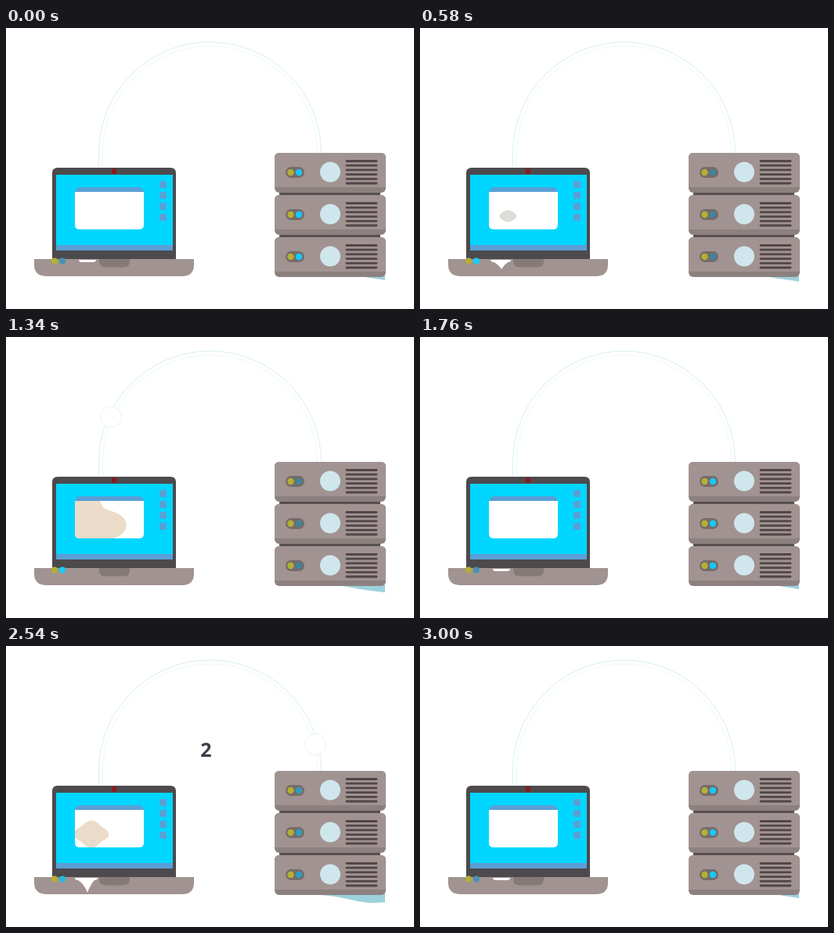
These frames come from a looping animation (521x360 px, 3020 ms). An HTML page:

```html
<!DOCTYPE html>
<html lang="en">
<head>
<meta charset="utf-8">
<title>Laptop and server</title>
<style>
  html, body { margin: 0; width: 100%; height: 100%; overflow: hidden; background: #fff; }
  svg { display: block; width: 521px; height: 360px; }
  #count { font: 700 25px "Open Sans", "Noto Sans", sans-serif; fill: #3b3f48; text-anchor: middle; }
</style>
</head>
<body>
<svg viewBox="0 0 521 360">
  <defs>
    <clipPath id="window"><path d="M88 210H176V252Q176 258 170 258H94Q88 258 88 252Z"/></clipPath>
    <clipPath id="screen"><rect x="64" y="188" width="149" height="97"/></clipPath>
    <g id="unit">
      <rect width="142" height="51" rx="6" fill="#8d8180"/>
      <path d="M0 44V6Q0 0 6 0H136Q142 0 142 6V44Z" fill="#a19391"/>
      <rect x="14" y="18" width="24" height="14" rx="7" fill="#766b6b"/>
      <circle cx="20.500" cy="25" r="4.200" fill="#b4b033"/>
      <circle class="lamp" cx="31" cy="25" r="4.200"/>
      <circle cx="71" cy="24.500" r="13" fill="#d0e6ed"/>
      <path class="vents" stroke="#514648" stroke-width="2.800" stroke-linecap="round"/>
    </g>
  </defs>

  <g fill="none">
    <path d="M118.500 178V160A142 142 0 0 1 402.500 160" stroke="#d8eff0"/>
    <path d="M123.500 178V160A137 137 0 0 1 397.500 160" stroke="#eef9f8"/>
  </g>
  <circle id="ball" r="13.500" fill="#fff" stroke="#e6f4f5"/>
  <text id="count" x="255.500" y="142">2</text>

  <path id="puddle" fill="#9cd1dc"/>
  <path d="M349 209H478V216H349ZM349 263H478V270H349Z" fill="#5a4f50"/>
  <g id="rack"></g>

  <path d="M59 297V186Q59 179 66 179H210Q217 179 217 186V297Z" fill="#4d4a4d"/>
  <circle cx="138" cy="183.500" r="3.300" fill="#8c171d"/>
  <rect x="64" y="188" width="149" height="97" fill="#00d6ff"/>
  <rect x="64" y="278" width="149" height="7" fill="#5a9fd6"/>
  <g id="icons" fill="#5a9fd6"></g>
  <path d="M88 211Q89 204 95 204H169Q175 204 176 211Z" fill="#5a9fd6"/>
  <path d="M88 210H176V252Q176 258 170 258H94Q88 258 88 252Z" fill="#fff"/>
  <g clip-path="url(#window)"><path id="liquid"/></g>
  <g clip-path="url(#screen)">
    <path id="glint" d="M101 286l30 -98h9l-30 98ZM124 286l30 -98h16l-30 98ZM148 286l30 -98h14l-30 98Z"
      fill="#fff" opacity=".3"/>
  </g>

  <path d="M36 296H240V303Q240 318 225 318H52Q36 318 36 303Z" fill="#a19391"/>
  <path d="M119 296H158V299Q158 306.500 150 306.500H127Q119 306.500 119 299Z" fill="#857a78"/>
  <path id="drip" fill="#fff"/>
  <circle cx="62" cy="298.500" r="4" fill="#b4b033"/>
  <circle id="power" cx="72" cy="298.500" r="4"/>
</svg>
<script>
const LOOP = 3020, TURN = 2 * Math.PI;
const $ = id => document.getElementById(id);
const set = (id, attrs) => {
  for (const name in attrs) $(id).setAttribute(name, attrs[name]);
};
const repeat = (n, f) => Array.from({ length: n }, (_, i) => f(i));

const lamp = document.querySelector(".lamp");
document.querySelector(".vents")
  .setAttribute("d", repeat(6, i => `M92 ${10.500 + 5.700 * i}h38`).join(""));
$("rack").innerHTML = repeat(3, i => `<use href="#unit" x="343" y="${160 + 54 * i}"/>`).join("");
$("icons").innerHTML = repeat(4, i =>
  `<rect x="196" y="${196 + 14 * i}" width="9" height="9" rx="2"/>`).join("");

const clamp = v => Math.max(0, Math.min(1, v));
const span = (t, a, b) => clamp((t - a) / (b - a));
const blend = (a, b, k) => `rgb(${a.map((v, i) => Math.round(v + (b[i] - v) * k))})`;

// Swells from 0 to 1, holds, then ebbs away.
const swell = (t, from, full, ebb, end) =>
  span(t, from, full) ** 2 * (1 - span(t, ebb, end)) ** 2;
const bump = (t, mid, half) => Math.max(0, 1 - ((t - mid) / half) ** 2);

// A spreading blob whose outline gets wavier as it grows.
function drawLiquid(t) {
  const size = 140 * (swell(t, 480, 850, 1050, 1700) + swell(t, 1820, 2100, 2250, 2720));
  const grown = clamp(size / 46);
  const points = repeat(72, i => {
    const a = i / 72 * TURN;
    const r = size * (1 + .250 * grown * Math.cos(4 * a));
    return [116 - 16 * grown + r * Math.cos(a), 241 + r * Math.sin(a) * (.600 + .400 * grown)];
  });
  set("liquid", {
    d: `M${points.join("L")}Z`,
    fill: blend([217, 223, 216], [234, 220, 200], span(size, 10, 18))
  });
}

function drawPuddle(t) {
  const flow = swell(t, 480, 850, 1050, 1560) + swell(t, 1820, 2150, 2300, 2900);
  const edge = .720 - 1.100 * flow;
  const shore = repeat(36, i => {
    const u = i / 35;
    const depth = 12 * span(u, edge, edge + .550) + 2 * flow * Math.sin(2 * TURN * u - 2.200);
    return [344 + 140 * u, 317 + Math.max(0, depth)];
  });
  set("puddle", { d: `M344 316L${shore.join("L")}L484 316Z` });
}

function drawDrip(t) {
  const fall = bump(t, 700, 180) + bump(t, 2540, 250);
  const [l, r] = [93 - 5 * fall, 115 + 2 * fall];
  const y = 300 + 5 * fall;
  set("drip", {
    d: `M${l} 297H${r}Q${r} 300 ${r - 4} 300Q108 ${y} 104 ${300 + 16 * fall}Q100 ${y} ${l + 4} 300Q${l} 300 ${l} 297Z`,
    visibility: t > 820 && t < 1600 ? "hidden" : "visible"
  });
}

// Out to the laptop, then back to the server.
function drawBall(t) {
  const out = t > 600 && t < 1470, back = t > 1790 && t < 2605;
  const deg = out
    ? 76 * span(t, 600, 920) + 104 * span(t, 920, 1470)
    : 180 * (1 - span(t, 1790, 2605));
  const a = deg / 360 * TURN;
  set("ball", {
    cx: 260.500 + 139 * Math.cos(a),
    cy: 160 - 139 * Math.sin(a),
    visibility: out || back ? "visible" : "hidden"
  });
}

// Server and laptop lamps blink in turn.
function drawLamps(t) {
  const glow = clamp(.500 + 4 * Math.cos(TURN * (t / (LOOP / 4) - .110)));
  lamp.setAttribute("fill", blend([62, 132, 155], [20, 202, 250], glow));
  set("power", { fill: blend([20, 205, 250], [72, 145, 180], glow) });
}

function draw(t) {
  drawLiquid(t);
  drawPuddle(t);
  drawDrip(t);
  drawBall(t);
  drawLamps(t);
  set("count", { opacity: span(t, 2380, 2440) - span(t, 2660, 2720) });
  set("glint", { transform: `translate(${(t - (t < 1600 ? 920 : 2220)) * .750} 0)` });
}

const start = performance.now();
function tick() {
  draw((performance.now() - start) % LOOP);
  requestAnimationFrame(tick);
}
tick();
</script>
</body>
</html>
```
